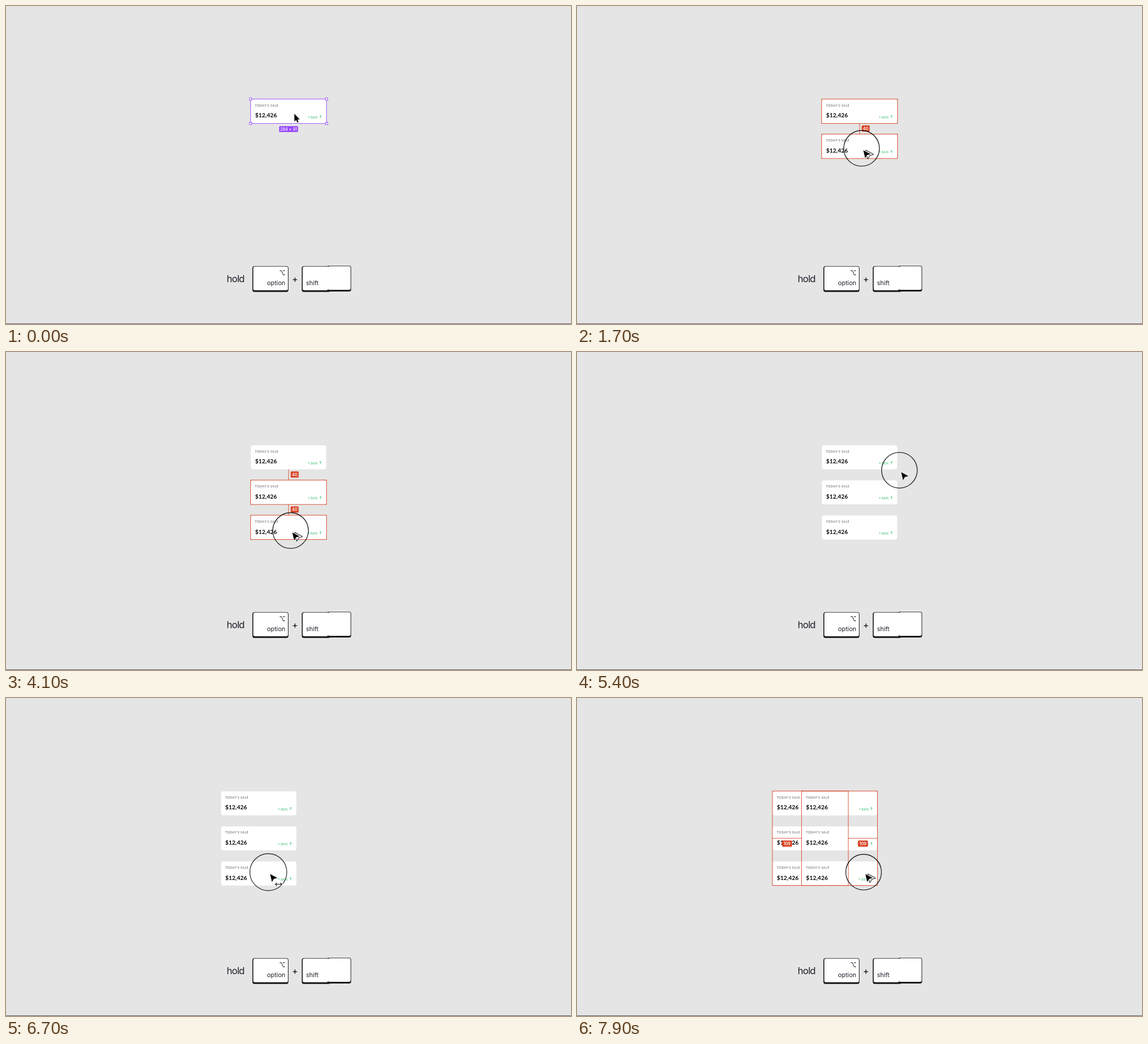
Recreate the animation shown at these times as an HTML page with a canvas. Size 960 by 540 pixels, loop 8 s.

```html
<!DOCTYPE html>
<html lang="en">
<head>
<meta charset="utf-8">
<title>Duplicate by dragging</title>
<style>
html, body { margin: 0; width: 100%; height: 100%; overflow: hidden; background: #e5e5e5; }
canvas { display: block; }
</style>
</head>
<body>
<canvas id="stage" width="960" height="540"></canvas>
<script>
const c = document.getElementById('stage').getContext('2d');
const LOOP = 8000, STEP = 100;
const X = 415.7, Y = 158, W = 129, H = 41.4, PITCH = 59.55, UNIT = 0.4545;
const TOTAL = 2 * PITCH + H;
const RED = '#d8401f', PURPLE = '#9747ff', GREEN = '#1fb95c', INK = '#1c1c28';
const PRESSES = [[700, 2000], [2900, 4500], [5200, 6000], [6300, 6600], [7300, 8000]];
const ARROW = [[0, 0], [12.3, 6.6], [6.2, 8.2], [3.2, 13.6]];
const POINTER = [[0, 0], [0, 13], [3, 10.5], [5, 15], [7, 14], [5.2, 9.8], [9, 9.5]];

const progress = (t, from, to) => Math.min(1, Math.max(0, (t - from) / (to - from)));

function ease(t, from, to) {
  const k = progress(t, from, to);
  return k * k * (3 - 2 * k);
}

// Ease out, overshooting by a tenth
function easeBack(t, from, to) {
  const k = progress(t, from, to) - 1;
  return 1 + 2.7 * k ** 3 + 1.7 * k ** 2;
}

function text(str, x, y, font, color, align = 'left', spacing = 0) {
  c.font = font;
  c.fillStyle = color;
  c.textAlign = align;
  c.letterSpacing = spacing + 'px';
  c.fillText(str, x, y);
}

function round(x, y, w, h, r, color) {
  c.fillStyle = color;
  c.beginPath();
  c.roundRect(x, y, w, h, r);
  c.fill();
}

function stroke(color, width, ...lines) {
  c.strokeStyle = color;
  c.lineWidth = width;
  c.beginPath();
  for (const line of lines) line.forEach((p, i) => i ? c.lineTo(...p) : c.moveTo(...p));
  c.stroke();
}

function box(x, y, w, h, color) {
  c.strokeStyle = color;
  c.lineWidth = 0.85;
  c.strokeRect(x, y, w, h);
}

function card(x, y) {
  round(x + 0.4, y + 0.5, W - 1, H - 0.6, 4, '#fff');
  text("TODAY'S SALE", x + 7.5, y + 12.8, '5px Lato, sans-serif', '#505050', 'left', 0.55);
  text('$12,426', x + 7.5, y + 31.4, 'bold 10px Lato, sans-serif', '#0b0b0b');
  text('+', x + 97, y + 32.5, '6.4px Lato, sans-serif', GREEN);
  text('36%', x + 101.4, y + 32.5, '6.4px Lato, sans-serif', GREEN);
  const ax = x + 118.7, ay = y + 27.8;
  stroke(GREEN, 0.7, [[ax, ay + 4.6], [ax, ay]],
    [[ax - 1.8, ay + 1.8], [ax, ay], [ax + 1.8, ay + 1.8]]);
}

function selection(x, y, h) {
  box(x, y, W, h, PURPLE);
  for (const hx of [x, x + W]) for (const hy of [y, y + h]) {
    c.fillStyle = '#fff';
    c.fillRect(hx - 2, hy - 2, 4, 4);
    box(hx - 2, hy - 2, 4, 4, PURPLE);
  }
  const label = '284 × ' + Math.round(h / UNIT), mid = x + W / 2;
  const w = label.length * 3.4 + 5;
  round(mid - w / 2, y + h + 4.7, w, 10, 1.5, PURPLE);
  text(label, mid, y + h + 12.2, '500 7px Inter, sans-serif', '#fff', 'center');
}

function badge(n, x, y) {
  const w = String(n).length * 3.6 + 6.2;
  round(x - w / 2, y - 5.2, w, 10.4, 1.5, RED);
  text(n, x, y + 2.6, '600 7px Inter, sans-serif', '#fff', 'center');
}

function measureY(from, to) {
  const x = X + W / 2;
  stroke(RED, 0.8, [[x, from], [x, to]]);
  badge(Math.round((to - from) / UNIT), x + 10.3, (from + to) / 2 - 0.5);
}

function measureX(from, to, y) {
  stroke(RED, 0.8, [[from, y], [to, y]]);
  badge(Math.round((to - from) / UNIT), (from + to) / 2, y + 9);
}

function dragDown(a, b) {
  if (b - a < 1) return selection(X, a, H);
  box(X, a, W, H, RED);
  box(X, b, W, H, RED);
  if (b - a > H) return measureY(a + H, b);
  measureY(a, b);
  measureY(a + H, b + H);
}

function shape(x, y, points, fill, edge, width) {
  c.beginPath();
  points.forEach(([px, py]) => c.lineTo(x + px, y + py));
  c.closePath();
  c.strokeStyle = edge;
  c.lineWidth = width;
  c.lineJoin = 'round';
  c.stroke();
  c.lineJoin = 'miter';
  c.fillStyle = fill;
  c.fill();
}

function cursor(t, x, y) {
  if (t < 500) return shape(x, y, POINTER, '#000', '#fff', 1);
  if (t < 4500 || t >= 7200) shape(x + 4.4, y + 0.4, ARROW, '#fff', '#111', 1.8);
  shape(x, y, ARROW, '#000', '#fff', 1.2);
  if (t >= 6400 && t < 7100) {
    const mid = x + 14.5, row = y + 17.3;
    const tips = [-1, 1].map(s =>
      [[mid + s * 3, row - 2.5], [mid + s * 5.5, row], [mid + s * 3, row + 2.5]]);
    const lines = [[[mid - 5.5, row], [mid + 5.5, row]], ...tips];
    stroke('#fff', 2.6, ...lines);
    stroke('#111', 1.1, ...lines);
  }
}

function ring(t, x, y) {
  for (const [down, up] of PRESSES) {
    if (t < down || t >= up + 300) continue;
    const age = Math.max(0, t - up);
    c.globalAlpha = Math.min(1, (t - down + 50) / 150) * (1 - (age / 300) ** 2);
    c.strokeStyle = '#0a0a0a';
    c.lineWidth = 1.15;
    c.beginPath();
    c.arc(x - 3, y - 3.3, 30.3 + age * 0.011, 0, 7);
    c.stroke();
    c.globalAlpha = 1;
  }
}

function keycap(x, y, w) {
  round(x, y, w, 43.7, 3.5, '#0d0d0d');
  round(x + 1.5, y + 0.8, w - 2.4, 40.2, 2.5, '#fff');
}

function legend() {
  text('hold', 375, 468.5, '16px Inter, sans-serif', INK, 'left', -0.7);
  keycap(418.7, 441.8, 61.2);
  // The wide key is two halves with a slight step
  keycap(502.6, 441.8, 49);
  keycap(546, 441, 40.4);
  c.fillStyle = '#fff';
  c.fillRect(540, 443, 16, 38.5);
  text('option', 474.5, 473.5, '10.4px Inter, sans-serif', INK, 'right');
  text('shift', 509.8, 473.5, '10.4px Inter, sans-serif', INK);
  text('+', 491, 469.3, '500 15px Inter, sans-serif', INK, 'center');
  stroke(INK, 1, [[465, 449.5], [468, 449.5], [471, 456.5], [474, 456.5]],
    [[470.5, 449.5], [474, 449.5]]);
  c.fillStyle = '#666';
  c.fillRect(0, 539, 960, 1);
}

function draw(t) {
  c.fillStyle = '#e5e5e5';
  c.fillRect(0, 0, 960, 540);
  legend();

  const drag1 = ease(t, 700, 1600), drag2 = easeBack(t, 2900, 3820);
  const away = ease(t, 4500, 5100);
  const left = ease(t, 6300, 6800), right = ease(t, 7300, 7900);
  const mx = 490 - 3.5 * drag1 + 80.5 * away - 43 * ease(t, 5150, 5750) - 84 * left + 50 * right;
  const my = 183 + 62 * drag1 + 61.5 * drag2 - 125.5 * away + 118 * ease(t, 5230, 5830);

  const second = Y + PITCH * drag1;
  const third = Y + PITCH + PITCH * drag2;
  const gx = X - 83.7 * ease(t, 6300, 7000);
  const cx = gx + 49.6 * right;

  const tops = [Y];
  if (t >= 700) tops.push(second);
  if (t >= 2900) tops.push(third);
  tops.forEach(y => card(gx, y));

  if (t < 2000) dragDown(Y, second);
  else if (t < 2900) selection(X, second, H);
  else if (t < 4500) {
    dragDown(second, third);
    if (drag2 === 1) measureY(Y + H, second);
  } else if (t < 5200) selection(X, third, H);
  else if (t >= 5500 && t < 6400) {
    const hits = tops.filter(y => mx < X + W && my > y);
    hits.forEach(y => box(X, y, W, H, PURPLE));
    if (hits.length) selection(X, Y, hits[hits.length - 1] + H - Y);
    if (t < 6000) {
      c.fillStyle = 'rgba(151,71,255,.1)';
      c.fillRect(567, 182, mx - 567, my - 182);
      box(567, 182, mx - 567, my - 182, PURPLE);
    }
  } else if (right > 0) {
    tops.forEach(y => card(cx, y));
    for (const x of [gx, cx]) box(x, Y, W, TOTAL, RED);
    for (const x of [0, W]) measureX(gx + x, cx + x, Y + TOTAL / 2);
  } else if (t >= 7100) {
    tops.forEach(y => box(gx, y, W, H, PURPLE));
    selection(gx, Y, TOTAL);
  }

  ring(t, mx, my);
  cursor(t, mx, my);
}

const start = performance.now();
function tick() {
  const t = (performance.now() - start) % LOOP;
  draw(Math.floor(t / STEP) * STEP);
  requestAnimationFrame(tick);
}
tick();
</script>
</body>
</html>
```
